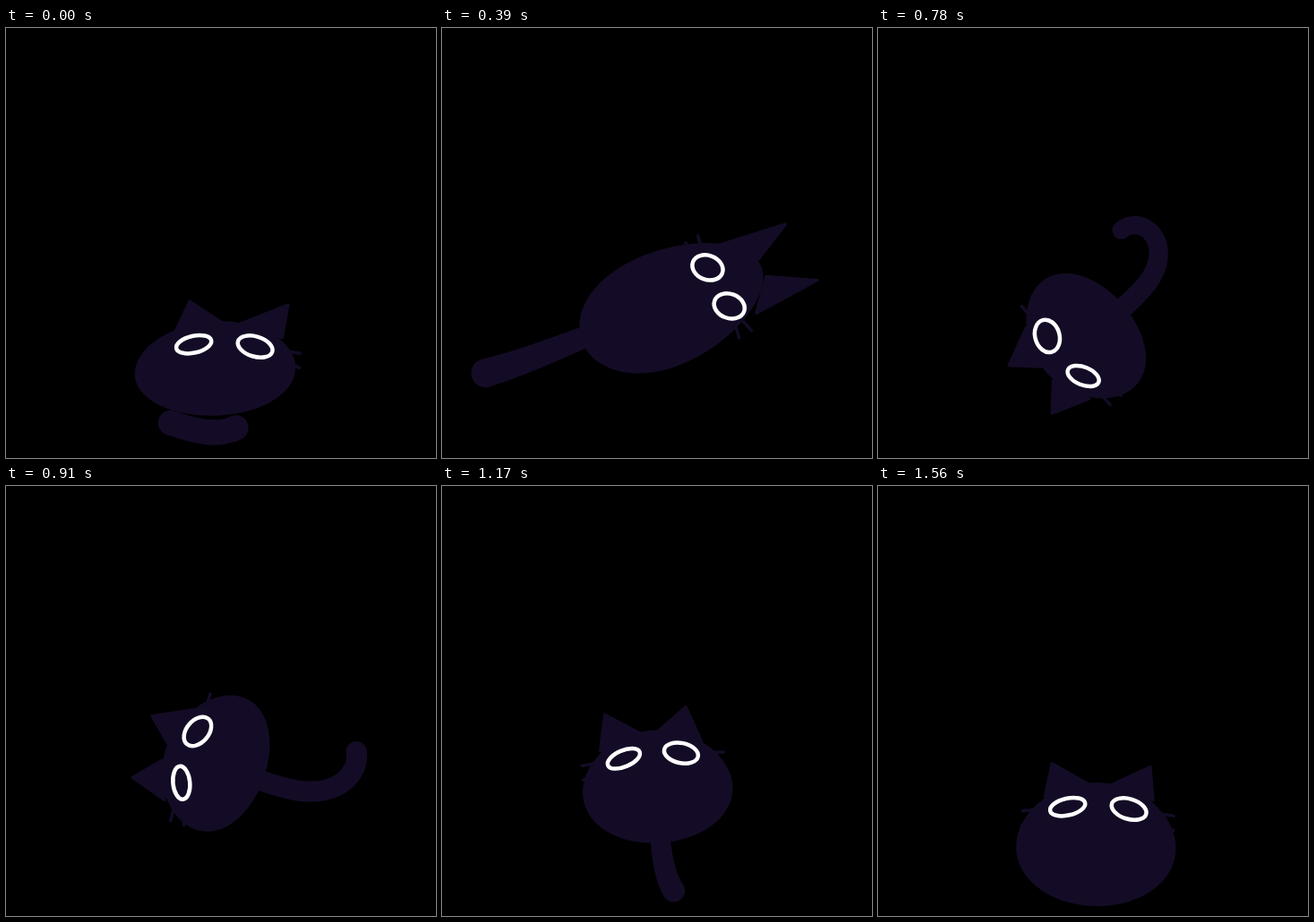
These frames come from a looping animation (480x480 px, 1820 ms). An HTML page with a canvas:

```html
<!DOCTYPE html>
<html lang="en">
<head>
<meta charset="utf-8">
<title>Tumbling cat</title>
<style>
  html, body { margin: 0; height: 100%; overflow: hidden; background: #000; }
  canvas { display: block; }
</style>
</head>
<body>
<canvas id="stage" width="480" height="480"></canvas>
<script>
const ctx = document.getElementById('stage').getContext('2d');
const FUR = '#140c26', STEP = 130;
const rad = deg => deg * Math.PI / 180;

// Build: half width and height, taper to the head, ears, eyes, tail root and radii
const sitting = { w: 89, h: 69, taper: 0.05, face: 0.59, ear: 48, spread: 55, cheek: 6,
  rx: 20, ry: 10.3, slant: 15, tilt: 0, rootX: 0, rootY: 0.6, r0: 10, r1: 12 };
const round = { w: 78, h: 57, taper: 0.09, face: 0.51, ear: 54, spread: 36, cheek: 1,
  rx: 18.5, ry: 11, slant: 22, tilt: 0, rootX: -4, rootY: 0.95, r0: 11.5, r1: 13 };
const long = { w: 71, h: 86, taper: 0.12, face: 0.51, ear: 82, spread: 36, cheek: -8,
  rx: 19, ry: 13, slant: 0, tilt: -40, rootX: -12, rootY: 0.93, r0: 12, r1: 18 };

// Tail: starts at angle aim (90 is straight back) and turns by bend along its length
const crouch = { ...sitting, x: 234, y: 380, heading: 2, h: 53, face: 0.49, lean: 9,
  rootX: -48, rootY: 1.18, r0: 14, r1: 14, length: 75, aim: 16, bend: -45 };
const leap = { ...long, x: 232, y: 290, heading: 13, lean: 6, length: 89, aim: 103, bend: -35 };
const dive = { ...long, x: 253, y: 329, heading: 108, lean: 9, rx: 16, ry: 14,
  rootX: -22, r1: 14, length: 105, aim: 92, bend: 48 };
const tumble = { ...round, x: 230, y: 346, heading: 228, lean: -1, ry: 11.8, slant: 26,
  r1: 10, length: 138, aim: 90, bend: -185 };
const rise = { ...round, x: 237, y: 271, heading: 347, lean: -5, ry: 10, slant: 20,
  length: 132, aim: 91, bend: -53 };
const land = { ...sitting, x: 243.5, y: 400, heading: 362, lean: 1, length: 8, aim: 90, bend: 0 };

function halfway(a, b) {
  return Object.fromEntries(Object.keys(a).map(key => [key, (a[key] + b[key]) / 2]));
}

const poses = [
  crouch, halfway(crouch, leap),
  leap, { ...halfway(leap, dive), x: 257, w: 64, h: 108, ear: 100, length: 120 },
  dive, halfway(dive, tumble),
  tumble, halfway(tumble, rise),
  rise, halfway(rise, land),
  land, { ...land, w: 106, h: 57, y: 412 },
  land, land
];

function drawTail({ h, rootX, rootY, r0, r1, length, aim, bend }) {
  const steps = 80;
  let x = rootX, y = rootY * h;
  ctx.beginPath();
  for (let i = 0; i <= steps; i++) {
    const u = i / steps, r = r0 + (r1 - r0) * u;
    const angle = rad(aim + bend * u ** 2.2);
    ctx.moveTo(x + r, y);
    ctx.arc(x, y, r, 0, 7);
    x += Math.cos(angle) * length / steps;
    y += Math.sin(angle) * length / steps;
  }
  ctx.fill();
}

function drawBody({ w, h, taper, face, lean }) {
  const skew = lean / (2 * face * h);
  ctx.beginPath();
  for (let deg = 0; deg < 360; deg += 4) {
    const s = Math.sin(rad(deg)), y = h * s;
    ctx.lineTo(w * Math.cos(rad(deg)) * (1 + taper * s) - skew * y, y);
  }
  ctx.fill();
}

function drawEar(side, { w, ear, spread, lean }) {
  ctx.beginPath();
  ctx.moveTo(side * w * 0.68 + lean * 0.4, -ear * 0.22);
  ctx.lineTo(side * spread + lean * 1.6, -ear);
  ctx.lineTo(side * 10 + lean * 0.8, -ear * 0.52);
  ctx.closePath();
  ctx.fill();
  ctx.lineWidth = 3;
  ctx.stroke();
}

function drawWhiskers(side, { w, cheek }, eyeX) {
  ctx.lineWidth = 3.5;
  for (const y of [cheek, cheek + 16]) {
    const x = side * w * 0.95, k = 14 / Math.hypot(eyeX - x, y);
    ctx.beginPath();
    ctx.moveTo(x, y);
    ctx.lineTo(x + (eyeX - x) * k, y - y * k);
    ctx.stroke();
  }
}

function drawEye(side, { rx, ry, slant, tilt }, eyeX) {
  ctx.beginPath();
  ctx.ellipse(eyeX, 0, rx, ry * (1 + side * slant / 170), rad(tilt + side * slant), 0, 7);
  ctx.lineWidth = 4.5;
  ctx.stroke();
}

function drawCat(pose) {
  ctx.save();
  ctx.translate(pose.x, pose.y);
  ctx.rotate(rad(pose.heading));
  ctx.lineCap = ctx.lineJoin = 'round';
  ctx.fillStyle = FUR;
  drawTail(pose);
  drawBody(pose);
  ctx.translate(pose.lean, -pose.face * pose.h);
  for (const side of [-1, 1]) {
    const eyeX = side * pose.w * 0.385;
    ctx.strokeStyle = FUR;
    drawEar(side, pose);
    drawWhiskers(side, pose, eyeX);
    ctx.strokeStyle = '#fff';
    drawEye(side, pose, eyeX);
  }
  ctx.restore();
}

function frame() {
  ctx.fillStyle = '#000';
  ctx.fillRect(0, 0, 480, 480);
  drawCat(poses[Math.floor(performance.now() / STEP) % poses.length]);
  requestAnimationFrame(frame);
}
frame();
</script>
</body>
</html>
```
